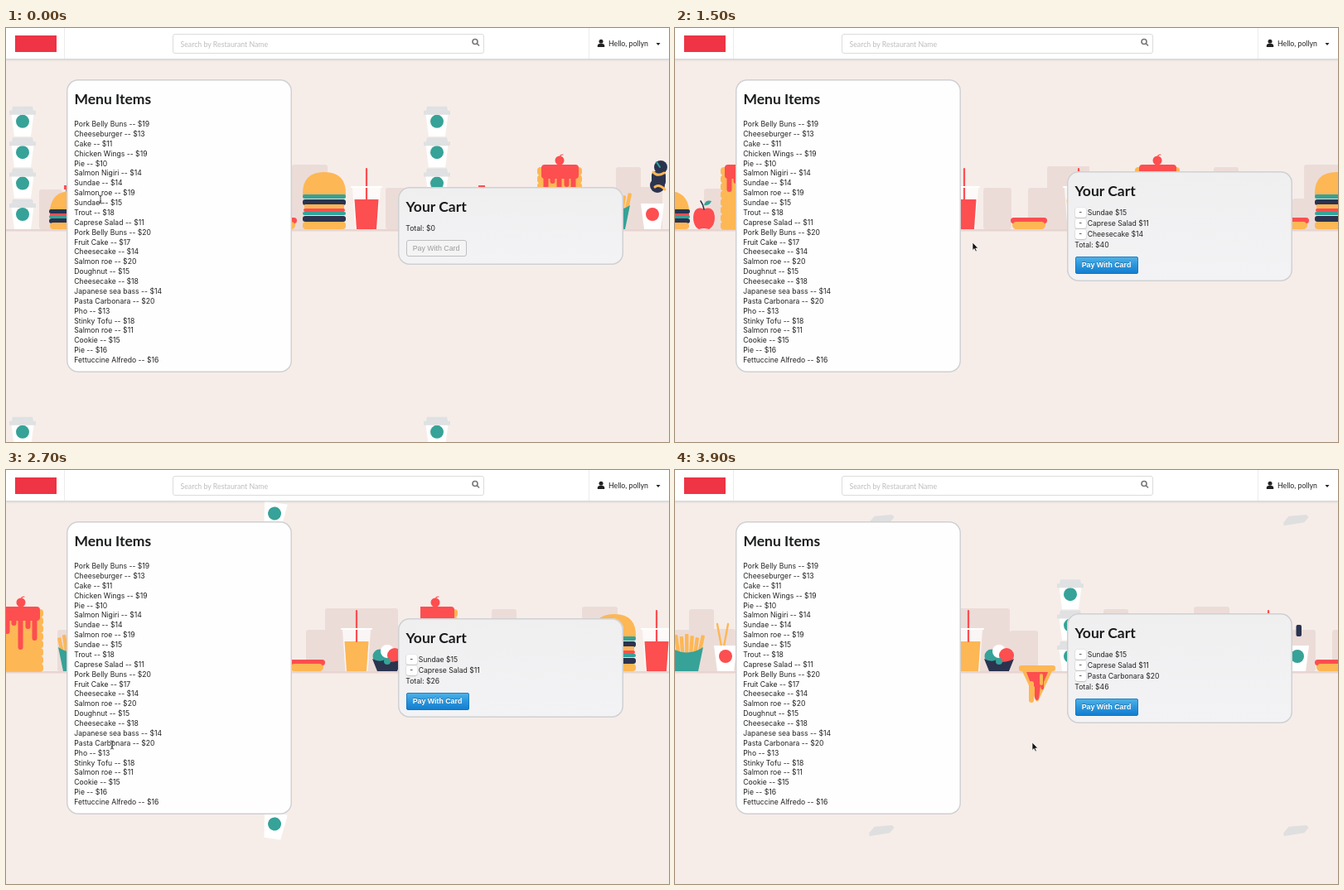
An HTML page with a canvas for the animation above (4 s loop, 800 px wide and 500 px high).

```html
<!DOCTYPE html>
<html lang="en">
<head>
<meta charset="utf-8">
<title>Menu and cart</title>
<style>
html, body { margin: 0; width: 100%; height: 100%; overflow: hidden; background: #f6ede9; }
#stage { position: relative; width: 800px; height: 500px; overflow: hidden; font: 8.65px/12px Inter, sans-serif; color: #222; }
#stage * { box-sizing: border-box; position: absolute; white-space: nowrap; }
#bar { left: 0; top: 0; width: 800px; height: 38px; background: #fff; border-bottom: 1px solid #d8d8d9; box-shadow: 0 1px 2px rgba(34,36,38,.12); font: 8.75px/12px Lato, sans-serif; }
.sep { top: 0; width: 1px; height: 37px; background: #ececec; }
#logo { left: 11px; top: 9px; width: 50px; height: 20px; background: #ee3445; }
#search { left: 201px; top: 7px; width: 376px; height: 24px; border: 1px solid #dcdcdd; border-radius: 3px; color: #bdbdbd; }
.card { width: 272px; border-radius: 14px; box-shadow: inset 0 0 0 1.5px #d0d0d2; }
#menu { left: 72.5px; top: 62px; height: 354px; background: #fefefe; }
#cart { left: 472.5px; background: linear-gradient(#efeff0, #f3f3f5); }
h1 { margin: 0; left: 10px; top: 13px; font: bold 17.5px/22px Lato, sans-serif; color: #1b1c1d; }
.less { left: 10.5px; width: 12.5px; height: 12px; border-radius: 2.5px; background: #fff; box-shadow: 0 .5px 1.5px rgba(0,0,0,.35); text-align: center; line-height: 11px; }
.pay { left: 10px; font: 8.8px/20px "Liberation Sans", Arial, sans-serif; text-align: center; border-radius: 3px; }
.off { width: 73px; height: 20px; line-height: 18px; border: 1px solid #bfbfc1; color: #9b9b9d; background: #f4f4f5; }
.on { width: 76px; height: 21px; line-height: 21px; font-weight: bold; color: #fff; background: linear-gradient(#4fb4ea, #2a95dc 50%, #127ccf); box-shadow: inset 0 0 0 .7px #1372b8; text-shadow: 0 -1px 0 rgba(0,0,0,.25); }
</style>
</head>
<body>
<div id="stage">
  <canvas id="scene" width="800" height="500" style="left:0;top:0"></canvas>
  <div id="bar">
    <div id="logo"></div>
    <div class="sep" style="left:70px"></div>
    <div class="sep" style="left:703px"></div>
    <div id="search"><span style="left:8.5px;top:5.5px">Search by Restaurant Name</span></div>
    <svg width="800" height="38" style="left:0;top:0">
      <g fill="none" stroke="#777" stroke-width="1.6"><circle cx="566" cy="16.5" r="3"/><path d="M568.3 18.8L571 21.5"/></g>
      <g fill="#222"><circle cx="718" cy="16.3" r="2.5"/><path d="M713.8 23v-1.5q0-2.6 2.6-2.6h3.2q2.6 0 2.6 2.6v1.5z"/><path d="M784.5 18h5l-2.5 3z"/></g>
    </svg>
    <span style="left:727px;top:12.5px">Hello, pollyn</span>
  </div>
  <div id="menu" class="card"><h1>Menu Items</h1></div>
  <div id="cart" class="card"></div>
  <svg id="cursor" width="800" height="500" style="left:0;top:0">
    <path id="arrow" d="M0 0V9.5L2.2 7.5L3.8 11L5.3 10.3L3.8 7H6.8Z" fill="#111" stroke="#fff" stroke-width=".7"/>
    <path id="beam" d="M-2 -5Q0 -5 0 -3.5Q0 -5 2 -5M0 -4V4M-2 5Q0 5 0 3.5Q0 5 2 5M-1.2 2H1.2" fill="none" stroke="#333" stroke-width=".9"/>
  </svg>
</div>
<script>
const LOOP = 4000, STEP = 100;
const ORANGE = '#fdb755', RED = '#fd4e50', TEAL = '#36a298', NAVY = '#2b334f', WHITE = '#fff', SHADE = '#ecdcd8';
const $ = id => document.getElementById(id);
const g = $('scene').getContext('2d');

const dishes = `Pork Belly Buns 19,Cheeseburger 13,Cake 11,Chicken Wings 19,Pie 10,Salmon Nigiri 14,Sundae 14,Salmon roe 19,
Sundae 15,Trout 18,Caprese Salad 11,Pork Belly Buns 20,Fruit Cake 17,Cheesecake 14,Salmon roe 20,Doughnut 15,Cheesecake 18,
Japanese sea bass 14,Pasta Carbonara 20,Pho 13,Stinky Tofu 18,Salmon roe 11,Cookie 15,Pie 16,Fettuccine Alfredo 16`.split(/,\s*/);

// [time, dishes in the cart]
const orders = [[0, []], [200, [8]], [600, [8, 10]], [1300, [8, 10, 13]], [2500, [8, 10]], [3000, [8, 10, 18]]];
// [time, distance]
const scroll = [[0, 0], [800, 46], [1500, 86], [2200, 128], [2700, 150], [3500, 195], [3900, 219]];
// [time, x, y]
const pointer = [[0, 114, 207], [800, 113, 248], [1300, 115, 270], [1500, 359, 259], [2200, 488, 250],
  [2500, 488, 250], [2700, 128, 332], [3500, 119, 334], [3600, 120, 334], [3900, 431, 329]];
// [left, width, top]
const skyline = [[40, 28, 195], [121, 22, 194], [212, 32, 193], [236, 30, 168], [262, 30, 192], [331, 16, 206], [345, 43, 165],
  [388, 20, 194], [458, 34, 193], [512, 30, 193], [535, 88, 167], [623, 34, 194]];

function at(keys, t) {
  const i = keys.findIndex(k => k[0] > t);
  if (i < 0) return keys[keys.length - 1].slice(1);
  const a = keys[i - 1], b = keys[i], p = (t - a[0]) / (b[0] - a[0]);
  return a.slice(1).map((v, n) => v + (b[n + 1] - v) * p);
}
const drop = (t, t0, t1, y0, y1) => {
  const p = Math.max(0, Math.min(1, (t - t0) / (t1 - t0)));
  return y0 + (y1 - y0) * p * p;
};

// Drawing helpers
function box(c, x, y, w, h, r = 0) {
  g.fillStyle = c; g.beginPath(); g.roundRect(x, y, w, h, r); g.fill();
}
function disc(c, x, y, r) {
  g.fillStyle = c; g.beginPath(); g.arc(x, y, r, 0, 7); g.fill();
}
function shape(c, d) { g.fillStyle = c; g.fill(new Path2D(d)); }
function line(c, w, d) {
  g.strokeStyle = c; g.lineWidth = w; g.lineCap = 'round'; g.stroke(new Path2D(d));
}
function put(x, y, fn, turn = 0) {
  g.save(); g.translate(x, y); g.rotate(turn); fn(); g.restore();
}

function cup(dot) {
  shape(WHITE, 'M-14 -13H14L10 18H-10Z');
  disc(dot, 0, 0, 8);
}
function lid() { shape('#dfe1e2', 'M-12 -18H12L13 -13H16V-8H-16V-13H-13Z'); }
function stack(n) {
  for (let i = 0; i < n; i++) put(0, 225 - 37.4 * i, () => { cup(TEAL); lid(); });
}
function soda(c) {
  shape('rgba(255,255,255,.75)', 'M-17 193H17L13.5 243H-13.5Z');
  shape(c, 'M-14.5 207H14.5L12 243H-12Z');
  line(RED, 2.2, 'M0 170V207');
  line(WHITE, 2, 'M-18 192H18');
}
function bigBurger() {
  shape(ORANGE, 'M-26 202Q-27 174 0 174Q27 174 26 202Z');
  box(TEAL, -26, 201, 52, 5, 2);
  box(NAVY, -26, 207, 52, 7, 3);
  box(ORANGE, -24, 213, 48, 6, 1);
  box(RED, -25, 218, 50, 4, 2);
  box(TEAL, -26, 222, 52, 4, 2);
  box(NAVY, -26, 227, 52, 7, 3);
  box(ORANGE, -26, 234, 52, 9, 4);
}
function burger() {
  line(NAVY, 1, 'M-5 191V198');
  box(RED, -8, 190, 8, 5);
  shape(ORANGE, 'M-25 219Q-22 197 0 197Q22 197 25 219Z');
  box(NAVY, -26, 219, 52, 5, 2);
  box(RED, -25, 224, 50, 3);
  box(TEAL, -26, 226, 52, 4, 2);
  box(NAVY, -26, 230, 52, 6, 3);
  box(ORANGE, -25, 235, 50, 8, 4);
}
function hotDog() {
  box(ORANGE, -20, 230, 40, 13, 5);
  box(RED, -22, 229, 44, 7, 3.5);
  box(ORANGE, -19, 234, 38, 9, 4);
}
function cake() {
  for (let y = 168; y < 240; y += 9.4) box(ORANGE, -27, y, 54, 10, 4);
  box(RED, -22, 165, 45, 17, 4);
  [[-17, 28], [-9, 18], [-1, 47], [8, 22], [16, 36]].forEach(([x, h]) => box(RED, x - 2.5, 170, 6, h, 3));
  disc(RED, 0, 160, 5.5);
  line(RED, 1.2, 'M1 156Q0 153 4 153');
}
function fries() {
  for (let i = 0; i < 7; i++) put(-15 + i * 5, 222, () => box(ORANGE, -2, -20 - (i * 3) % 5, 4.4, 26, 1), (i - 3) * .07);
  shape(TEAL, 'M-20 214Q0 227 20 214L14 243H-14Z');
}
function bowl() {
  disc(TEAL, -9, 225, 8.5);
  disc(WHITE, 0, 219, 8);
  disc(RED, 9, 224, 9);
  shape(NAVY, 'M-18 228Q-9 233 -3 229Q5 235 18 228L12 243H-12Z');
  disc(TEAL, 0, 231, 4);
}
function pizza() {
  shape(ORANGE, 'M-19 241H19L3 275Q0 284 -3 275Z');
  box(ORANGE, -22, 236, 44, 7, 3);
  shape(RED, 'M-13 244H13L8 256V264Q5 268 4 260L2 276Q-1 281 -3 275V262L-8 257Z');
  box(ORANGE, -10, 255, 6, 26, 3);
  box(ORANGE, 3, 246, 4, 14, 2);
}
function apple() {
  shape(RED, 'M0 219C-16 211 -16 240 -6 243Q0 241 6 243C17 238 15 211 0 219Z');
  line(NAVY, 1.6, 'M0 219Q-1 213 -4 209');
  shape(TEAL, 'M0 214Q2 207 9 209Q7 215 0 214Z');
}
function noodles(y) {
  put(8, y, () => {
    disc(NAVY, 2, -14, 8); disc(NAVY, -2, 8, 9); box(NAVY, -9, -9, 17, 18, 5);
    line(ORANGE, 3, 'M-7 -8Q-2 -2 6 -7M-5 10Q0 6 7 13');
    line(TEAL, 2, 'M-3 -20L1 -14');
  });
}

function tile(t, shift) {
  box('#e6d5d1', 0, 243, 500, 2.5);
  g.translate(-shift, 0);
  skyline.forEach(([x, w, y]) => box(SHADE, x, y, w, 243 - y, 3));
  const item = (x, fn) => { if (x > shift - 40 && x < shift + 540) put(x, 0, fn); };
  item(20, () => stack(4));
  item(78, burger);
  item(121, apple);
  item(168, cake);
  item(233, fries);
  item(280, () => {
    if (t < 500) noodles(drop(t, 0, 500, 182, 222));
    if (t >= 900) put(-4, drop(t, 900, 1200, -25, 185), () => line(ORANGE, 2.4, 'M-6 1L-1 28M7 1L2 28'));
    put(0, 225, () => cup(RED));
  });
  item(329, hotDog);
  item(384, bigBurger);
  item(435, () => soda(RED));
  item(470, () => {
    const head = drop(t, 3000, 3300, 0, 213), tail = drop(t, 3550, 3900, 0, 187);
    if (t > 3000) box(NAVY, -1.5, tail, 6.5, Math.max(0, Math.min(head, tail > 150 ? 201 : 213) - tail), 2);
    if (t >= 2500) put(4 * (t < 2900), drop(t, 2500, 2900, -5, 225), () => cup(TEAL), t < 2900 ? .15 : 0);
    if (t >= 3700) put(-2, drop(t, 3700, 4100, 11, 207), () => shape('#dfdfe0', 'M-15 2L-8 -5H13L16 -2L10 4L-15 6Z'), -.08);
  });
  item(513, hotDog);
  item(573, () => soda(ORANGE));
  item(610, bowl);
  item(656, pizza);
  item(696, () => stack(3));
}

function drawScene(t) {
  const [shift] = at(scroll, t);
  g.fillStyle = '#f6ede9';
  g.fillRect(0, 0, 800, 500);
  for (const y of [0, 375]) for (const x of [0, 500]) {
    g.save();
    g.beginPath(); g.rect(x, y, 500, 375); g.clip();
    g.translate(x, y);
    tile(t, shift);
    g.restore();
  }
}

function label(parent, text, x, y, cls = '') {
  const el = document.createElement('span');
  el.textContent = text;
  el.className = cls;
  if (x !== null) el.style.left = x + 'px';
  el.style.top = y + 'px';
  parent.append(el);
}
const split = i => dishes[i].match(/(.+) (\d+)$/).slice(1);

dishes.forEach((d, i) => {
  const [name, price] = split(i);
  label($('menu'), `${name} -- $${price}`, 9.8, 48 + 11.875 * i);
});

let shown = null;
function drawCart(t) {
  const [, list] = orders.filter(o => o[0] <= t).pop();
  if (list === shown) return;
  shown = list;
  const el = $('cart'), rows = 13 * list.length, h = 94 + rows;
  el.style.top = 239 - h / 2 + 'px';
  el.style.height = h + 'px';
  el.innerHTML = '<h1>Your Cart</h1>';
  let total = 0;
  list.forEach((d, i) => {
    const [name, price] = split(d), y = 44 + 13 * i;
    total += +price;
    label(el, '-', null, y, 'less');
    label(el, `${name} $${price}`, 25.2, y);
  });
  label(el, 'Total: $' + total, 9.8, 44 + rows);
  label(el, 'Pay With Card', null, 64 + rows, 'pay ' + (list.length ? 'on' : 'off'));
}

function drawPointer(t) {
  const [x, y] = at(pointer, t), free = x > 190;
  $('arrow').style.display = free ? '' : 'none';
  $('beam').style.display = free ? 'none' : '';
  $(free ? 'arrow' : 'beam').setAttribute('transform', `translate(${x} ${y})`);
}

let start = null, last = -1;
function frame(now) {
  if (start === null) start = now;
  const t = Math.floor((now - start) % LOOP / STEP) * STEP;
  if (t !== last) {
    last = t;
    drawScene(t);
    drawCart(t);
    drawPointer(t);
  }
  requestAnimationFrame(frame);
}
requestAnimationFrame(frame);
</script>
</body>
</html>
```
